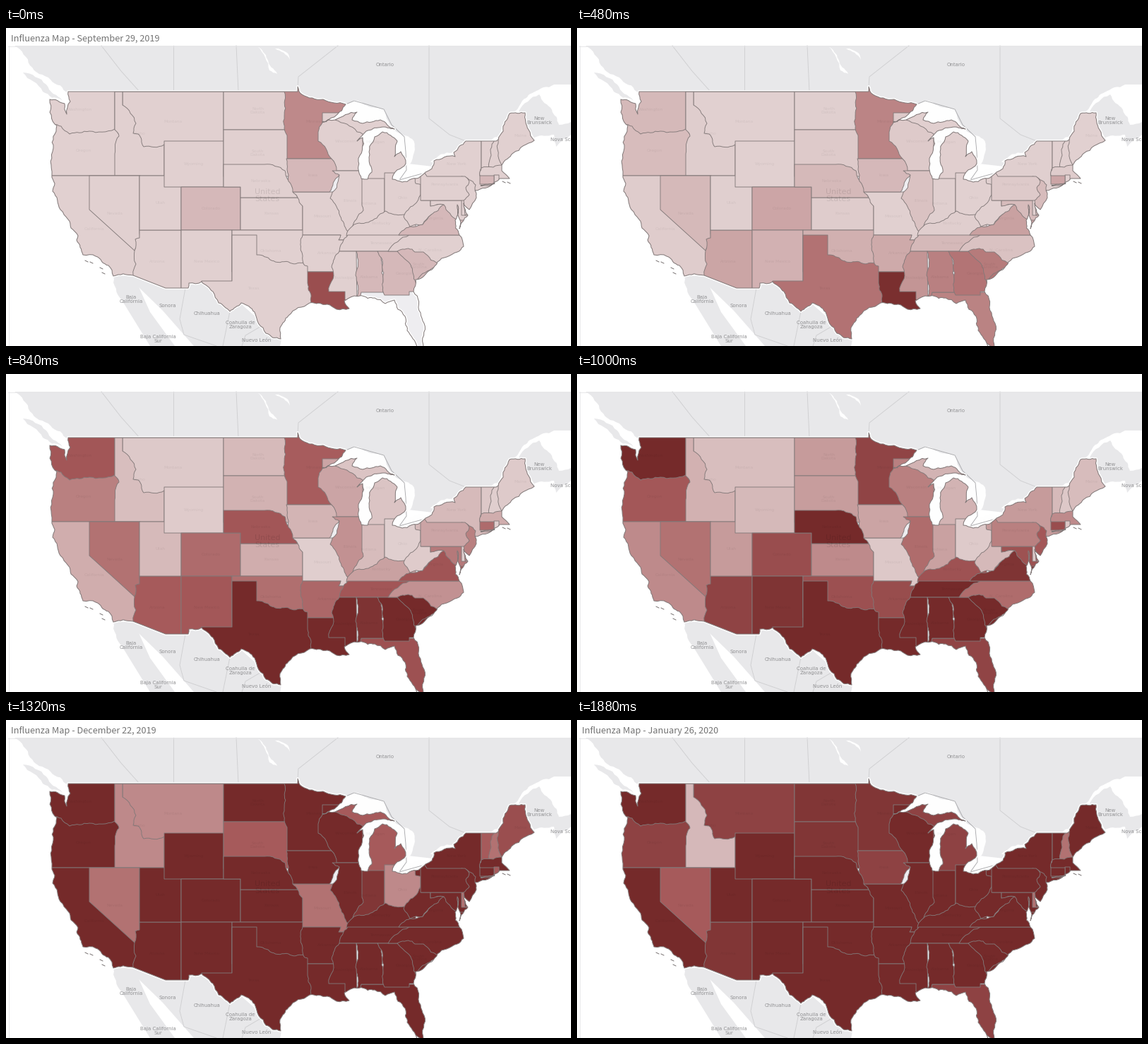
Recreate the animation shown at these times as a matplotlib script. Size 800 by 450 pixels, loop 1920 ms.

```python
import math
import random

import matplotlib.pyplot as plt
import numpy as np
from matplotlib.animation import FuncAnimation

W, H, DPI = 800, 450, 100
FRAMES, STEP = 48, 40
PX = 72 / DPI
WEEK = 2.75  # frames per week
LOW, MID, HIGH = np.array([(225, 208, 208), (166, 90, 91), (117, 42, 42)]) / 255
LAND, SEA, EDGE = "#e8e8ea", "#fefefe", "#827979"

fig = plt.figure(figsize=(W / DPI, H / DPI), dpi=DPI, facecolor="white")
ax = fig.add_axes([0, 0, 1, 1])
ax.set(xlim=(0, W), ylim=(H, 0))
ax.axis("off")


def bend(p, q, amp, rng):
    """Points from p up to q, split at random like a river or a shore."""
    dx, dy = q[0] - p[0], q[1] - p[1]
    if not 5 < math.hypot(dx, dy) < 48:
        return [p]
    k = rng.uniform(-amp, amp)
    mid = ((p[0] + q[0]) / 2 - dy * k, (p[1] + q[1]) / 2 + dx * k)
    return bend(p, mid, amp, rng) + bend(mid, q, amp, rng)


def wiggle(flat, amp=0.12):
    rng = random.Random(4)
    pts = list(zip(flat[::2], flat[1::2]))
    out = []
    for p, q in zip(pts, pts[1:] + pts[:1]):
        straight = p[0] == q[0] or p[1] == q[1]
        out += [p] if straight else bend(p, q, amp, rng)
    return out


def area(color, *flat, z=1, edge="none", lw=0.9):
    return ax.add_patch(plt.Polygon(wiggle(flat), fc=color, ec=edge, lw=lw * PX,
                                    zorder=z, joinstyle="round", snap=False))


def line(*flat, color="#cfcfd1", z=1.5):
    ax.plot(flat[::2], flat[1::2], color=color, lw=0.9 * PX, zorder=z)


def label(x, y, text, size=7, color="#929294", alpha=1):
    ax.text(x, y, text, size=size * PX, color=color, alpha=alpha, ha="center",
            va="center", zorder=8, linespacing=0.9, family="DejaVu Sans", clip_on=True)


def box(x0, y0, x1, y1):
    return x0, y0, x1, y0, x1, y1, x0, y1


# Canada, Mexico and the lakes
area(LAND, 12, 25, 34, 53, 63, 73, 88, 93, 110, 140, 640, 200, 674, 163, 698, 153,
     716, 121, 747, 91, 776, 80, 800, 80, 800, 25)
area(LAND, 24, 63, 57, 80, 80, 103, 52, 90)
area(LAND, 726, 118, 755, 94, 773, 116, 783, 137, 800, 133, 800, 151, 779, 168,
     776, 151, 748, 155)
area(LAND, 152, 351, 181, 351, 204, 402, 239, 450, 204, 450, 164, 385)
area(LAND, 180, 351, 226, 368, 279, 361, 330, 388, 389, 440, 388, 450, 266, 450,
     222, 400, 187, 366)
area(SEA, 356, 26, 370, 44, 384, 65, 373, 60)
area(SEA, 381, 29, 398, 35, 402, 45)
area(SEA, 449, 131, 481, 107, 493, 102, 535, 114, 553, 147, 575, 157, 579, 172,
     566, 205, 604, 198, 602, 207, 555, 217, 500, 216, 496, 145, z=1.6)
area(SEA, 601, 190, 609, 184, 641, 174, 635, 184, z=1.6)
line(481, 108, 493, 103, 535, 115, 546, 137, 564, 154, 566, 175, 567, 201, 557, 215,
     600, 203, 609, 187, 637, 178, color="#a9a9ac", z=1.7)
line(135, 25, 163, 61, 189, 90)
line(237, 25, 237, 90)
line(326, 25, 329, 90)
line(413, 84, 414, 69, 470, 25)
line(599, 25, 599, 128, 628, 151, 651, 160)
line(254, 368, 246, 412, 252, 434, 298, 450)
line(317, 401, 307, 450)
line(363, 421, 339, 435, 334, 450)

# Outline of the country, clockwise pieces joined into one ring
EAST = [697, 158, 704, 146, 713, 121, 735, 120, 740, 144, 748, 159, 718, 177, 702, 194,
        702, 202, 713, 213, 699, 213, 691, 219, 672, 223, 692, 220, 664, 230, 666, 240,
        656, 257, 648, 248, 654, 265, 642, 284, 643, 272, 639, 250, 636, 272, 642, 293,
        648, 309, 639, 317, 624, 324, 611, 331, 603, 342, 580, 356, 577, 373]
SOUTH = [587, 403, 592, 418, 591, 452, 582, 452, 568, 428, 565, 408, 550, 385, 537, 390,
         522, 382, 484, 383, 479, 386, 486, 397, 468, 398, 455, 391, 430, 389, 400, 407,
         388, 424, 389, 440, 368, 432, 352, 402, 333, 389, 317, 401, 301, 389, 293, 373,
         277, 359, 259, 361, 258, 368, 226, 368, 180, 350]
WEST = [152, 351, 145, 336, 127, 323, 109, 321, 100, 300, 102, 294, 92, 283, 88, 271,
        77, 257, 66, 231, 69, 220, 65, 208, 67, 170, 72, 138, 69, 136, 62, 101, 83, 107,
        86, 122, 91, 104, 88, 90]
NORTH = [413, 90, 413, 83, 419, 94, 449, 101, 481, 108, 448, 133, 466, 130, 497, 119,
         490, 130, 505, 135, 530, 130, 550, 143, 510, 146, 497, 160, 505, 155, 499, 189,
         503, 213, 512, 214, 518, 204, 514, 183, 522, 154, 533, 147, 554, 160, 550, 182,
         559, 175, 566, 192, 547, 214, 561, 218, 587, 210, 603, 199, 606, 188, 636, 182,
         634, 176, 651, 160, 694, 160]
RING = EAST + SOUTH + WEST + NORTH
coast = area("#eeedf0", *RING, z=2, edge=SEA, lw=4)
area("none", *RING, z=5, edge=EDGE, lw=1)

states = []


def state(name, season, *flat):
    """Later states cover earlier ones; the coast cuts them all."""
    patch = area(LAND, *flat, z=3, edge=EDGE)
    patch.set_clip_path(coast.get_path(), ax.transData)
    states.append((patch, season))
    label((min(flat[::2]) + max(flat[::2])) / 2, (min(flat[1::2]) + max(flat[1::2])) / 2,
          name, 6, "black", 0.06)


# Season: first level, frame of the peak, steepness, levels after the peak
state("Washington", (1, 25, 3), *box(55, 80, 154, 150))
state("Oregon", (1, 31, 2.5, 10, 8, 8), 55, 138, 78, 139, 90, 150, 118, 146, 154, 143,
      165, 153, 165, 209, 55, 209)
state("Montana", (1, 33, 5, 4, 3, 8), *box(165, 90, 308, 175))
state("Idaho", (1, 33, 3, 4, 2, 2), 154, 90, 165, 90, 165, 109, 184, 135, 180, 149,
      187, 150, 195, 168, 224, 165, 224, 209, 154, 209, 154, 178, 160, 153, 154, 144)
state("California", (1, 33, 4, 10, 9, 10), *box(60, 209, 190, 360))
state("Nevada", (1, 17, 4, 5, 3, 6), 118, 209, 189, 209, 189, 290, 182, 315, 118, 257)
state("Arizona", (1, 29, 1.8, 10, 10, 9), 189, 286, 248, 286, 248, 375, 180, 375,
      180, 349, 184, 334, 182, 315, 183, 299, 189, 297)
state("Utah", (1, 33, 5), *box(189, 209, 248, 286))
state("Wyoming", (1, 32, 9), *box(224, 160, 308, 225))
state("Colorado", (2, 30, 2.5), *box(248, 225, 332, 286))
state("New Mexico", (1, 26, 2.5), *box(248, 286, 320, 375))

state("North\nDakota", (1, 33, 5, 10, 8, 9), *box(308, 90, 405, 144))
state("South\nDakota", (1, 33, 3, 6, 7, 9), *box(308, 144, 405, 210))
state("Kansas", (1, 33, 4), *box(332, 240, 420, 286))
state("Nebraska", (1, 25, 3), 308, 193, 366, 193, 395, 202, 405, 224, 413, 240, 332, 240,
      332, 225, 308, 225)
state("Oklahoma", (1, 31, 2), *box(320, 286, 430, 345))
state("Texas", (1, 20, 1.6), 320, 293, 355, 293, 355, 321, 376, 329, 400, 331, 440, 339,
      440, 445, 260, 445, 277, 358, 320, 358)
state("Minnesota", (4, 28, 4, 10, 6, 9), 389, 80, 490, 80, 490, 185, 398, 185, 398, 152,
      394, 125)
state("Missouri", (1, 33, 9, 5, 10, 10), 406, 232, 490, 232, 490, 293, 479, 300, 471, 300,
      474, 293, 420, 293, 420, 252, 413, 240)
state("Iowa", (2, 32, 9, 10, 7, 8), 397, 185, 461, 185, 472, 208, 458, 232, 406, 232,
      398, 200)
state("Arkansas", (1, 31, 1.8), 420, 293, 474, 293, 471, 300, 490, 300, 490, 345, 427, 345,
      427, 337, 423, 336)
state("", (7, 14, 1), 427, 345, 470, 345, 490, 373, 490, 410, 430, 410, 432, 380, 427, 361)

state("Wisconsin", (1, 33, 3.5, 10, 8, 10), 448, 120, 520, 120, 520, 160, 501, 202, 468, 202,
      461, 185, 442, 160, 442, 147, 448, 134)
state("Michigan", (1, 33, 5, 6, 4, 8), 466, 130, 500, 110, 580, 110, 580, 214, 505, 214,
      505, 150, 497, 147)
state("Illinois", (1, 33, 2.7), 462, 202, 501, 202, 504, 213, 515, 275, 484, 288, 473, 266,
      459, 241, 472, 208)
state("Indiana", (1, 33, 5, 9, 5, 10), 504, 213, 536, 213, 536, 285, 490, 285, 506, 258,
      504, 251)
state("Ohio", (1, 33, 9, 4, 3, 10), *box(536, 205, 587, 275))
state("Kentucky", (1, 27, 6), 482, 294, 484, 287, 500, 276, 525, 269, 537, 259, 580, 263,
      580, 294)
state("Tennessee", (1, 25, 3), 472, 316, 484, 293, 590, 293, 590, 316)
state("Mississippi", (1, 20, 2.5), 472, 316, 496, 316, 497, 390, 480, 384, 480, 373,
      457, 373, 463, 355, 461, 338)
state("", (1, 33, 1, 10, 8, 8), 503, 374, 600, 374, 600, 460, 500, 390)
state("Alabama", (2, 22, 2), 496, 316, 526, 316, 534, 357, 534, 374, 503, 374, 505, 390,
      497, 390, 495, 350)
state("Georgia", (2, 20, 2), 526, 316, 600, 316, 600, 373, 571, 373, 571, 378, 536, 378,
      534, 357)
state("N. Carolina", (1, 33, 2.7), 541, 316, 571, 293, 660, 293, 660, 335, 600, 335, 554, 316)
state("South\nCarolina", (2, 21, 2), 554, 316, 575, 313, 579, 317, 591, 317, 615, 337,
      580, 360, 574, 338)
state("Virginia", (2, 26, 2.7), 556, 293, 572, 281, 590, 278, 602, 264, 620, 245, 660, 245,
      660, 293)
state("", (1, 32, 9, 10, 9, 10), 563, 267, 578, 250, 587, 236, 588, 244, 601, 244, 601, 252,
      620, 250, 602, 264, 590, 278, 572, 281)

state("", (1, 30, 2.5), 601, 244, 660, 244, 660, 272, 640, 272, 620, 250, 601, 252)
state("", (1, 33, 9, 5, 5, 5), *box(645, 240, 660, 265))
state("New York", (1, 33, 5), 580, 220, 590, 180, 650, 150, 673, 160, 673, 198, 671, 209,
      695, 215, 695, 235, 660, 235)
state("", (1, 31, 2.5), 645, 210, 665, 222, 664, 229, 680, 240, 650, 265)
state("Pennsylvania", (1, 33, 3.5), 587, 200, 596, 210, 650, 210, 656, 217, 651, 226,
      656, 236, 648, 244, 587, 244)
state("", (1, 33, 6, 6, 6, 10), *box(673, 150, 694, 198))
state("", (1, 33, 9, 5, 6, 5), 694, 150, 705, 150, 705, 198, 684, 198, 687, 180)
state("Maine", (1, 33, 7, 7, 10, 10), 697, 158, 697, 110, 760, 110, 760, 194, 702, 194)
state("", (1, 33, 4), 673, 198, 690, 197, 702, 194, 720, 194, 720, 220, 695, 220, 671, 209)
state("", (1, 33, 9, 6, 10, 10), *box(691, 208, 698, 222))
state("", (2, 30, 2.5), *box(671, 209, 691, 221))

label(370, 237, "United\nStates", 11, "black", 0.1)
for x, y, name in ((537, 52, "Ontario"), (177, 384, "Baja\nCalifornia"),
                   (229, 393, "Sonora"), (284, 404, "Chihuahua"),
                   (332, 420, "Coahuila de\nZaragoza"), (355, 442, "Nuevo León"),
                   (215, 440, "Baja California\nSur"), (755, 131, "New\nBrunswick"),
                   (792, 158, "Nova Scotia")):
    label(x, y, name)
for x, y in ((114, 330), (121, 332), (135, 340), (138, 347), (705, 218), (712, 219)):
    line(x - 2, y - 1, x + 2, y + 1, color="#6e6868", z=6)

line(3, 25.5, 800, 25.5, color="#e6e6e8", z=9)
line(3.5, 25, 3.5, 450, color="#e6e6e8", z=9)
title = ax.text(7, 14, "", size=12.75 * PX, color="#747474", va="center_baseline",
                family="Noto Sans CJK JP", zorder=10)


def date(week):
    day, year = 29 + 7 * week, 2019
    for month, days in (("September", 30), ("October", 31), ("November", 30),
                        ("December", 31), ("January", 31)):
        if day <= days:
            break
        day -= days
    return f"{month} {day}, {year + (month == 'January')}"


def level(i, first, full, power, peak=10, dip=10, last=10):
    if i <= 33:
        return first + (peak - first) * min(i / full, 1) ** power
    return np.interp(i, [33, 43, 47], [peak, dip, last])


def shade(v):
    return [np.interp(v, [1, 6, 10], c) for c in zip(LOW, MID, HIGH)]


def update(i):
    for patch, season in states:
        patch.set_facecolor(shade(level(i, *season)))
        if season == (1, 33, 1, 10, 8, 8):  # no report before November
            patch.set_visible(i >= 10)
    shown = i < 2 or (i > 26 and i not in (44, 45))
    title.set_text("Influenza Map - " + date(int(i / WEEK)) if shown else "")
    return []


anim = FuncAnimation(fig, update, frames=FRAMES, interval=STEP, repeat=True,
                     repeat_delay=0)
plt.show()
```
